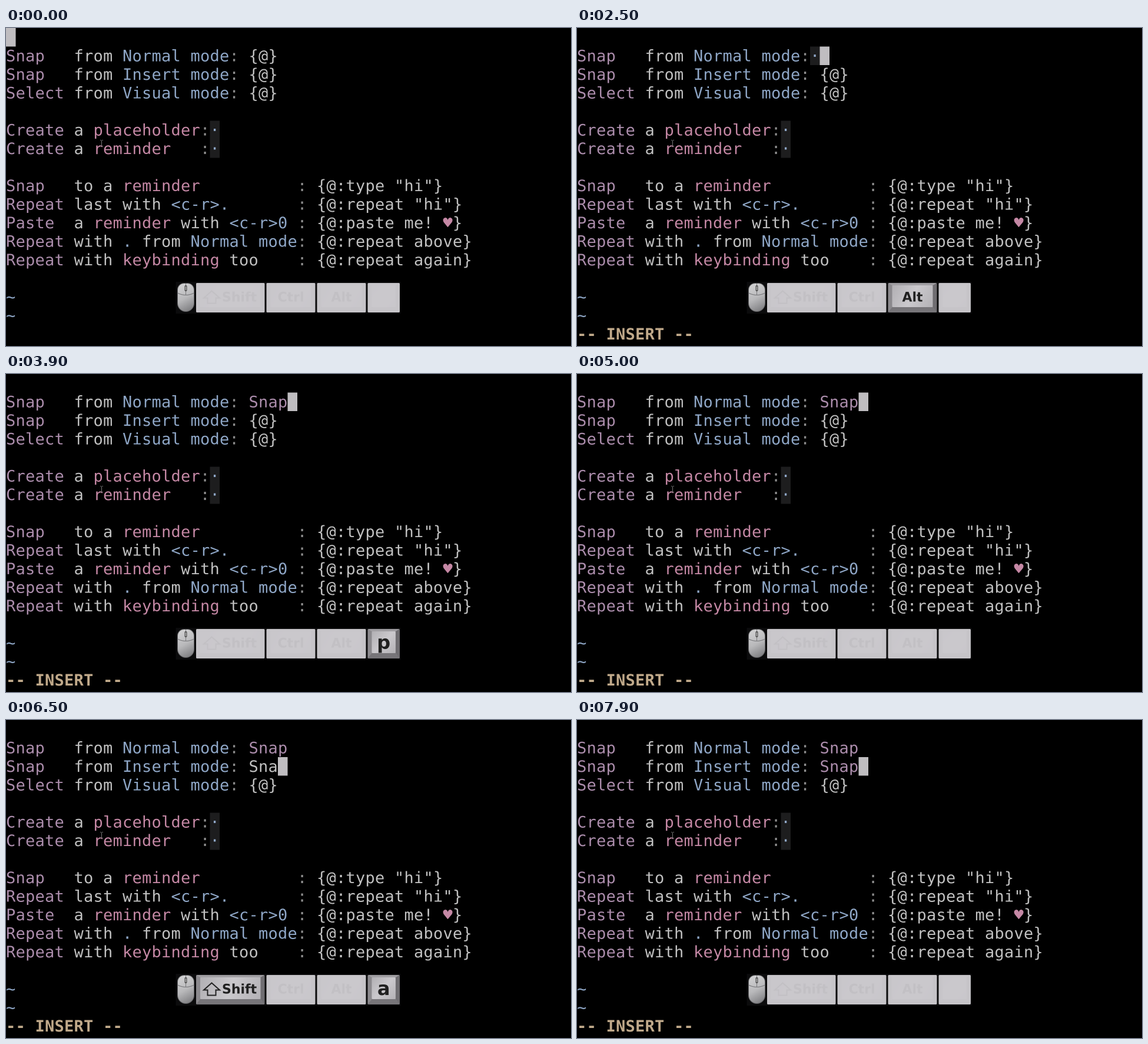
These frames come from a looping animation (960 px wide and 540 px high, 8 s). An HTML page with a canvas:

```html
<!DOCTYPE html>
<html lang="en">
<head>
<meta charset="utf-8">
<title>Editor demo</title>
<style>
  html, body { margin: 0; width: 100%; height: 100%; overflow: hidden; background: #000; }
  canvas { display: block; }
</style>
</head>
<body>
<canvas id="stage" width="960" height="540"></canvas>
<script>
const stage = document.getElementById('stage').getContext('2d');
stage.imageSmoothingQuality = 'high';

// The screen is drawn at 1920 x 1080 and shown at half size.
const screen2x = document.createElement('canvas');
screen2x.width = 1920;
screen2x.height = 1080;
const ctx = screen2x.getContext('2d');

const LOOP = 8000;
const CELL_W = 33, CELL_H = 63, ASCENT = 50;
const MONO = '54px "DejaVu Sans Mono", monospace';
const SANS = '"DejaVu Sans", sans-serif';
const COLORS = {
  verb: '#ac8dac', mode: '#8fa7c7', noun: '#c588a5', mark: '#8c8c8c',
  text: '#c1c1c1', status: '#c0a98a', trail: '#1d1d1e', cursor: '#bfbdc0'
};
const SYNTAX = new RegExp([
  '(?<verb>\\b(?:Snap|Select|Create|Repeat|Paste)\\b)',
  '(?<mode>(?:Normal|Insert|Visual) mode|<c-r>[.0]|\\.|·|~)',
  '(?<noun>placeholder|reminder|keybinding|♥)',
  '(?<mark>:(?= |·|$))',
  '(?<text>[^ ])'
].join('|'), 'g');

const LINES = [
  '',
  'Snap   from Normal mode: {@}',
  'Snap   from Insert mode: {@}',
  'Select from Visual mode: {@}',
  '',
  'Create a placeholder:·',
  'Create a reminder   :·',
  '',
  'Snap   to a reminder          : {@:type "hi"}',
  'Repeat last with <c-r>.       : {@:repeat "hi"}',
  'Paste  a reminder with <c-r>0 : {@:paste me! ♥}',
  'Repeat with . from Normal mode: {@:repeat above}',
  'Repeat with keybinding too    : {@:repeat again}',
  '',
  '~',
  '~'
];

// Each snap: when the cursor jumps to a row, then when each letter lands.
const SNAPS = [
  { row: 1, at: 1750, typed: [2900, 3200, 3400, 3600] },
  { row: 2, at: 5450, typed: [6200, 6350, 6450, 6600] }
];
const WORD = 'Snap';

// Spans during which a key is lit: [label, from, to]
const MODIFIERS = [
  ['Alt', 1350, 2650], ['Shift', 2750, 3500],
  ['Alt', 5050, 5950], ['Shift', 6050, 6950]
];
const LETTERS = [
  ['l', 1700, 2300], ['S', 2900, 3200], ['n', 3200, 3400], ['a', 3400, 3600], ['p', 3600, 4300],
  ['l', 5400, 5950], ['S', 6200, 6350], ['n', 6350, 6450], ['a', 6450, 6600], ['p', 6600, 7500]
];
const KEYS = [['Shift', 323, 116.5], ['Ctrl', 442.5, 83], ['Alt', 528.5, 83]];

const lit = (spans, t) => spans.filter(([, from, to]) => t >= from && t < to).map(s => s[0]);

function text(str, x, y, font, color, align = 'left') {
  ctx.font = font;
  ctx.fillStyle = color;
  ctx.textAlign = align;
  ctx.fillText(str, x, y);
}

function rect(x, y, w, h, color) {
  ctx.fillStyle = color;
  ctx.fillRect(x, y, w, h);
}

function round(x, y, w, h, r, fill) {
  ctx.beginPath();
  ctx.roundRect(x, y, w, h, r);
  ctx.fillStyle = fill;
  ctx.fill();
}

function outline(color, width) {
  ctx.lineWidth = width;
  ctx.strokeStyle = color;
  ctx.stroke();
}

function poly(points, fill) {
  ctx.beginPath();
  points.forEach(([x, y]) => ctx.lineTo(x, y));
  ctx.closePath();
  if (fill) {
    ctx.fillStyle = fill;
    ctx.fill();
  }
}

function gradient(x0, y0, x1, y1, ...stops) {
  const g = ctx.createLinearGradient(x0, y0, x1, y1);
  stops.forEach((c, i) => g.addColorStop(i / (stops.length - 1), c));
  return g;
}

const cell = (col, row, color) =>
  rect(col * CELL_W, row * CELL_H, CELL_W, CELL_H, color);

function gridText(str, col, row, font, color) {
  [...str].forEach((c, i) =>
    text(c, (col + i) * CELL_W, row * CELL_H + ASCENT, font, color));
}

function drawLine(str, row) {
  if (str.endsWith('·')) cell(str.length - 1, row, COLORS.trail);
  for (const m of str.matchAll(SYNTAX)) {
    const kind = Object.keys(m.groups).find(k => m.groups[k]);
    gridText(m[0], m.index, row, MONO, COLORS[kind]);
  }
}

function drawEditor(t) {
  const lines = [...LINES];
  let cursor = [0, 0];
  for (const { row, at, typed } of SNAPS) {
    if (t < at) continue;
    const count = typed.filter(k => t >= k).length;
    const base = lines[row].slice(0, -4);
    lines[row] = count ? base + ' ' + WORD.slice(0, count) : base + '·';
    cursor = [25 + count, row];
  }
  lines.forEach(drawLine);
  cell(...cursor, COLORS.cursor);
  if (t >= SNAPS[0].at) gridText('-- INSERT --', 0, 16, 'bold ' + MONO, COLORS.status);
}

function drawPointer() {
  rect(162, 191, 1, 9, '#777');
  for (const y of [190, 200]) {
    rect(160, y, 2, 1, '#666');
    rect(163, y, 2, 1, '#666');
  }
}

function drawMouse() {
  ctx.beginPath();
  ctx.roundRect(291.5, 433.5, 28, 48, [11, 11, 14, 14]);
  ctx.fillStyle = gradient(293, 435, 318, 481, '#d4d4d5', '#b9b9bb', '#77777a');
  ctx.fill();
  outline('#626264', 1);
  ctx.beginPath();
  ctx.moveTo(291.5, 450);
  ctx.quadraticCurveTo(305.5, 457, 319.5, 450);
  ctx.moveTo(305.5, 434);
  ctx.lineTo(305.5, 453);
  outline('#77777a', 1);
  round(303.5, 437, 4, 10, 2, '#444');
  round(304.5, 438.5, 2, 7, 1, '#aaa');
}

function drawShiftArrow() {
  poly([[349.5, 446.5], [363, 458.5], [356.5, 458.5], [356.5, 467.5],
    [342.5, 467.5], [342.5, 458.5], [336, 458.5]]);
  outline('#222', 2);
}

function drawKey(label, x, w, on) {
  const y = 433, h = 50, r = x + w, b = y + h;
  const l2 = x + 7, r2 = r - 7, t2 = y + 4, b2 = b - 9;
  round(x, y, w, h, 2, '#a09ea2');
  ctx.save();
  ctx.clip();
  poly([[x, y], [l2, t2], [l2, b2], [x, b]], '#8b898d');
  poly([[r, y], [r2, t2], [r2, b2], [r, b]], '#6f6d71');
  poly([[x, b], [l2, b2], [r2, b2], [r, b]], '#777579');
  ctx.restore();
  round(l2, t2, r2 - l2, b2 - t2, 2, gradient(l2, t2, r2, b2, '#b2b0b4', '#cbc9cd', '#b4b2b6'));

  const mid = x + w / 2;
  const big = label.length === 1;
  if (label === 'Shift') {
    drawShiftArrow();
    text(label, 367, 464.5, `bold 22px ${SANS}`, '#202020');
  } else {
    text(label, mid, big ? 467 : 464.5, `bold ${big ? 32 : 22}px ${SANS}`, '#202020', 'center');
  }
  if (!on) round(x, y, w, h, 2, 'rgba(203, 201, 205, 0.95)');
}

function drawKeys(t) {
  rect(288.5, 431, 382, 54, '#0b0b0c');
  drawMouse();
  const mods = lit(MODIFIERS, t);
  const [letter = ''] = lit(LETTERS, t);
  for (const [label, x, w] of KEYS) drawKey(label, x, w, mods.includes(label));
  drawKey(letter, 614.5, 54.5, letter !== '');
}

function frame(t) {
  rect(0, 0, 1920, 1080, '#000');
  drawEditor(t);
  ctx.save();
  ctx.scale(2, 2);
  drawPointer();
  drawKeys(t);
  ctx.restore();
  stage.drawImage(screen2x, 0, 0, 960, 540);
}

const start = performance.now();
function tick() {
  frame((performance.now() - start) % LOOP);
  requestAnimationFrame(tick);
}
tick();
</script>
</body>
</html>
```
